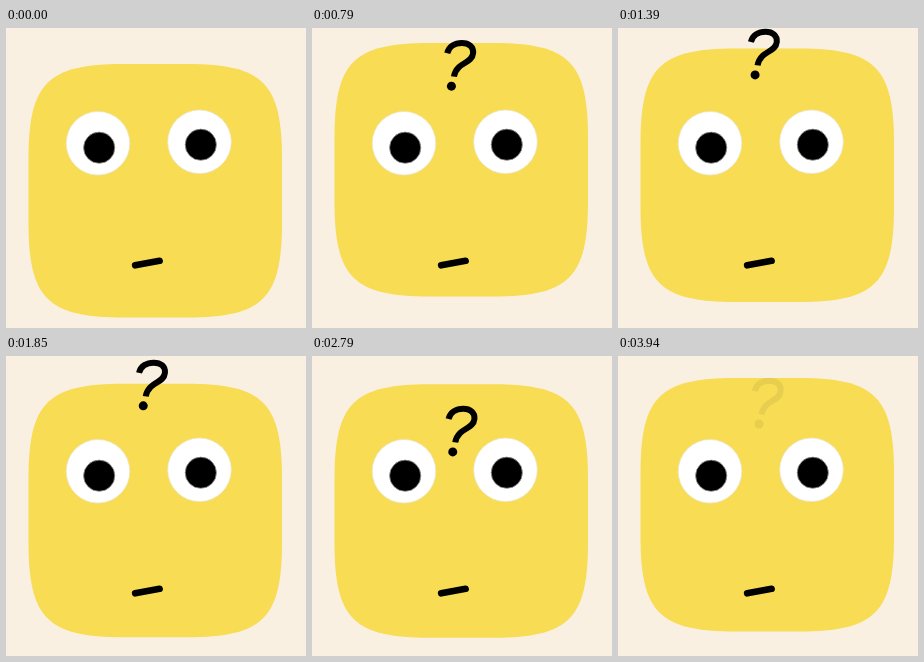
Recreate the animation shown at these times as an HTML page. Size 300 by 300 pixels, loop 3970 ms.

```html
<!DOCTYPE html>
<html lang="en">
<head>
<meta charset="utf-8">
<title>Puzzled face</title>
<style>
  html, body { margin: 0; width: 100%; height: 100%; overflow: hidden; background: #faf0e1; }
  svg { display: block; width: 100vw; height: 100vh; }
</style>
</head>
<body>
<svg viewBox="0 0 300 300">
  <path id="head" fill="#f7dc54" d="M0 95C0 19 19 0 95 0H158.5C234.5 0 253.5 19 253.5 95V158.5C253.5 234.5 234.5 253.5 158.5 253.5H95C19 253.5 0 234.5 0 158.5Z"/>
  <g fill="#fff" stroke="#eee5c4" stroke-width=".8">
    <circle cx="92" cy="115.3" r="31.8"/>
    <circle cx="193.5" cy="113.8" r="31.8"/>
  </g>
  <g stroke="#999" stroke-width=".8">
    <circle cx="93.2" cy="119.7" r="15.6"/>
    <circle cx="194.8" cy="116.7" r="15.6"/>
  </g>
  <path d="M129.2 237.3L153.6 232.8" stroke="#000" stroke-width="6.7" stroke-linecap="round"/>
  <g id="mark" opacity="0">
    <path fill="none" stroke="#000" stroke-width="6" d="M-12.7 13C-11 6 -5 2.8 2 2.8C9 2.8 13.8 6.6 13.2 13C12.4 21 4 22 -1 27C-4.5 30.5 -5.5 33 -6 36.5"/>
    <circle cx="-8.5" cy="46" r="4.5"/>
  </g>
</svg>
<script>
  const LOOP = 3970;
  const head = document.getElementById('head');
  const mark = document.getElementById('mark');

  // Progress of a move that runs from time a to time b
  const linear = (t, a, b) => Math.min(1, Math.max(0, (t - a) / (b - a)));
  const sine = (t, a, b) => (1 - Math.cos(Math.PI * linear(t, a, b))) / 2;
  const gentle = (t, a, b) => (linear(t, a, b) + sine(t, a, b)) / 2;

  const headY = t => 36 - 22 * gentle(t, 0, 850) + 17.5 * gentle(t, 850, 2200) - 9.5 * gentle(t, 2200, 3820);

  function markPlace(t) {
    const rise = sine(t, 500, 1500);
    const drop = sine(t, 1690, 2660);
    const lift = sine(t, 2700, 3480);
    const settle = sine(t, 3480, 3820);
    return [
      148.5 - 3 * rise + 3.7 * drop + 1.6 * lift - 1.3 * settle,
      15 - 14.5 * rise + 50.5 * drop - 32.5 * lift + 3.5 * settle
    ];
  }

  const markAlpha = t => linear(t, 480, 600) - linear(t, 3825, 3948);

  function draw(now) {
    const t = now % LOOP;
    head.setAttribute('transform', `translate(22.5 ${headY(t)})`);
    mark.setAttribute('transform', `translate(${markPlace(t)})`);
    mark.setAttribute('opacity', markAlpha(t));
  }

  const start = performance.now();
  function tick() {
    draw(performance.now() - start);
    requestAnimationFrame(tick);
  }
  tick();
</script>
</body>
</html>
```
